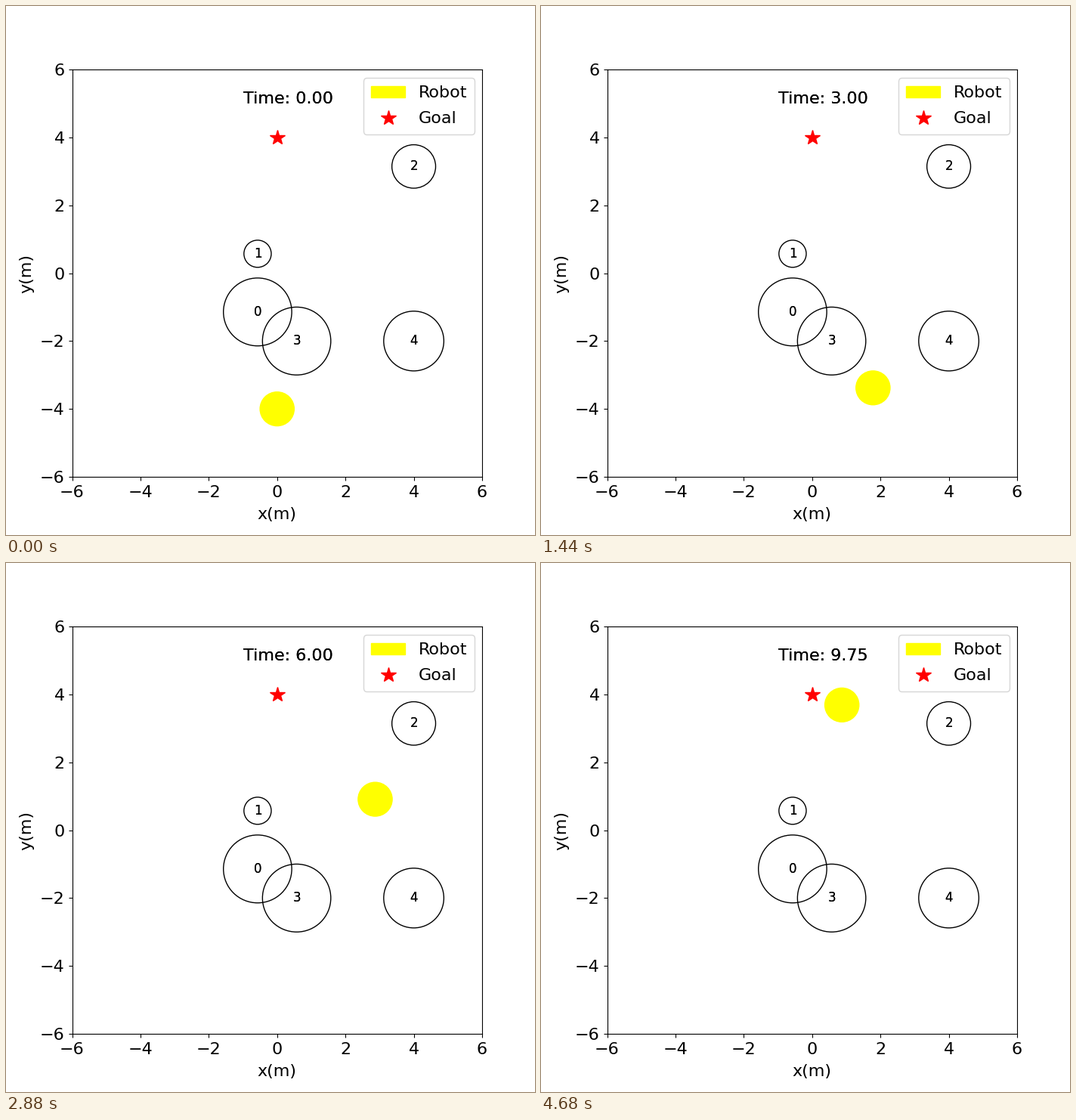
A matplotlib script that plays this animation: 700 by 700 pixels, repeating every 4.8 s.

```python
import numpy as np
import matplotlib.pyplot as plt
from matplotlib.animation import FuncAnimation
from matplotlib.lines import Line2D

FRAMES, INTERVAL, DT = 40, 120, 0.25

# key points of the robot's way, x + yj at a step
KEYS = {
    0: -4j, 5: 0.44 - 3.92j, 8: 1.23 - 3.77j, 10: 1.49 - 3.74j,
    16: 2.35 - 2.08j, 24: 2.87 + 0.91j, 30: 2.465 + 2.28j,
    34: 2.1 + 2.61j, 39: 0.872 + 3.688j,
}
STEPS = np.array(list(KEYS), float)
POINTS = np.array(list(KEYS.values()))
SLOPES = np.gradient(POINTS, STEPS)
SLOPES[0] = 0  # starts from rest

# obstacles stand on an 8 x 8 lattice: column, row, radius
COLS, ROWS = np.linspace(-4, 4, 8), np.linspace(-2, 4, 8)
OBSTACLES = [(3, 1, 1.0), (3, 3, 0.4), (7, 6, 0.64), (4, 0, 1.0), (7, 0, 0.88)]


def position(step):
    """Cubic Hermite curve through the key points."""
    i = min(np.searchsorted(STEPS, step, side="right") - 1, len(STEPS) - 2)
    h = STEPS[i + 1] - STEPS[i]
    u = (step - STEPS[i]) / h
    ease = u * u * (3 - 2 * u)
    bend = h * u * (1 - u) * (SLOPES[i] * (1 - u) - SLOPES[i + 1] * u)
    p = POINTS[i] * (1 - ease) + POINTS[i + 1] * ease + bend
    return p.real, p.imag


def label(x, y, text, size):
    """Text laid down twice, which gives it firmer edges."""
    return [ax.text(x, y, text, fontsize=size, color="black") for _ in range(2)]


plt.rcParams["font.family"] = "DejaVu Sans"
fig, ax = plt.subplots(figsize=(7, 7), dpi=100)
ax.tick_params(labelsize=16)
ax.tick_params(axis="x", pad=4.6)
ax.set(xlim=(-6, 6), ylim=(-6, 6))
ax.set_xlabel("x(m)", fontsize=16, labelpad=6.5)
ax.set_ylabel("y(m)", fontsize=16, labelpad=5.3)

robot = plt.Circle(position(0), 0.5, color="yellow")
goal = Line2D([0], [4], color="red", marker="*", linestyle="None", markersize=15)
ax.add_artist(robot)
ax.add_artist(goal)
ax.legend([robot, goal], ["Robot", "Goal"], fontsize=16, loc="upper right",
          bbox_to_anchor=(1.0027, 1), labelspacing=0.63, borderpad=0.465)

for i, (col, row, radius) in enumerate(OBSTACLES):
    x, y = COLS[col], ROWS[row]
    ax.add_artist(plt.Circle((x, y), radius, fill=False))
    label(x - 0.11, y - 0.11, str(i), 12)

clock = label(-1, 5, "Time: 0.00", 16)


def update(step):
    robot.center = position(step)
    for text in clock:
        text.set_text(f"Time: {step * DT:.2f}")
    return [robot, *clock]


anim = FuncAnimation(fig, update, frames=FRAMES, interval=INTERVAL,
                     repeat=True, repeat_delay=0)
plt.show()
```
